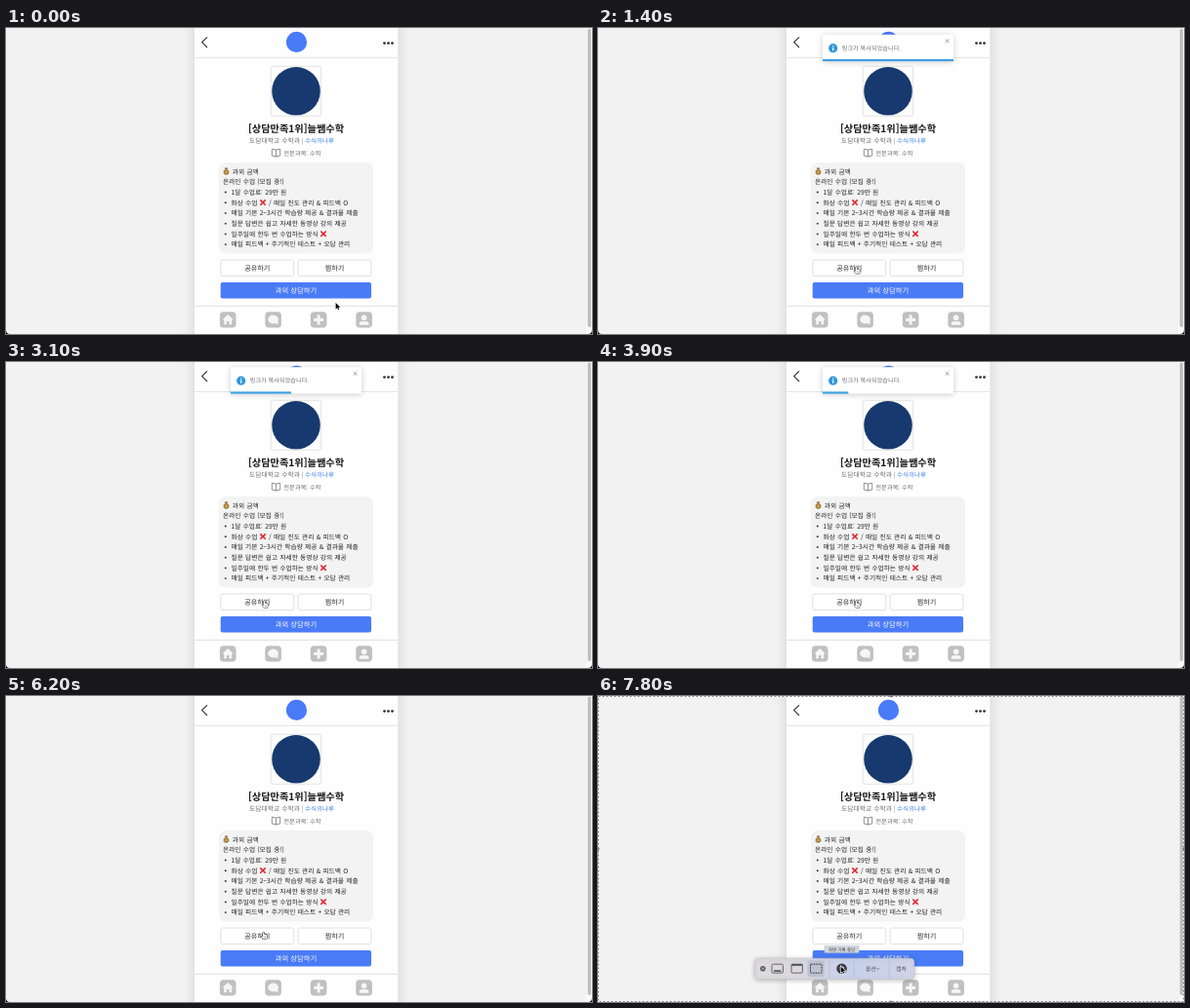
An HTML page with a canvas for the animation above (7900 ms loop, 600x314 px).

```html
<!DOCTYPE html>
<html lang="ko">
<head>
<meta charset="utf-8">
<title>과외 프로필</title>
<style>
html, body { margin: 0; width: 100%; height: 100%; overflow: hidden; background: #f2f2f2; }
canvas { display: block; width: 600px; height: 314px; }
</style>
</head>
<body>
<canvas id="stage"></canvas>
<script>
const LOOP = 7900, STEP = 100, W = 600, H = 314;
const FONT = '"Noto Sans CJK KR", "Noto Sans CJK", "Noto Sans CJK JP", sans-serif';
const BLUE = '#4a7bf7', INK = '#222';

const canvas = document.getElementById('stage');
const ctx = canvas.getContext('2d');
const dpr = window.devicePixelRatio || 1;
canvas.width = W * dpr;
canvas.height = H * dpr;
ctx.scale(dpr, dpr);

const clamp = v => Math.max(0, Math.min(1, v));
const easeOut = p => 1 - (1 - p) ** 3;
const easeInOut = p => p * p * (3 - 2 * p);

// Value of a keyframed track [[time, value], ...] at time t.
function track(t, keys, ease) {
  for (let i = 1; i < keys.length; i++) {
    const [t0, a] = keys[i - 1], [t1, b] = keys[i];
    if (t < t1) return a + (b - a) * ease(clamp((t - t0) / (t1 - t0)));
  }
  return keys[keys.length - 1][1];
}

function box(x, y, w, h, r, fill, stroke, lw = 0.8) {
  ctx.beginPath();
  ctx.roundRect(x, y, w, h, r);
  if (fill) { ctx.fillStyle = fill; ctx.fill(); }
  if (stroke) { ctx.strokeStyle = stroke; ctx.lineWidth = lw; ctx.stroke(); }
}

function disc(x, y, r, fill) {
  ctx.beginPath();
  ctx.arc(x, y, r, 0, Math.PI * 2);
  ctx.fillStyle = fill;
  ctx.fill();
}

function line(points, color, lw = 1) {
  ctx.beginPath();
  points.forEach(([x, y], i) => i ? ctx.lineTo(x, y) : ctx.moveTo(x, y));
  ctx.strokeStyle = color;
  ctx.lineWidth = lw;
  ctx.stroke();
}

function poly(points, fill, stroke, lw) {
  ctx.beginPath();
  points.forEach(([x, y], i) => i ? ctx.lineTo(x, y) : ctx.moveTo(x, y));
  ctx.closePath();
  if (stroke) { ctx.strokeStyle = stroke; ctx.lineWidth = lw; ctx.stroke(); }
  ctx.fillStyle = fill;
  ctx.fill();
}

// y is the vertical middle of the glyphs.
function text(s, x, y, size, color = INK, align = 'left', weight = 400, gap = 0) {
  ctx.font = `${weight} ${size}px ${FONT}`;
  ctx.textAlign = align;
  ctx.textRendering = 'geometricPrecision';
  ctx.wordSpacing = gap + 'px';
  ctx.fillStyle = color;
  ctx.fillText(s, x, y + size * 0.37);
}

function cross(x, y, r, color, lw) {
  line([[x - r, y - r], [x + r, y + r]], color, lw);
  line([[x + r, y - r], [x - r, y + r]], color, lw);
}

function withShadow(alpha, blur, dy, paint) {
  ctx.save();
  ctx.shadowColor = `rgba(0,0,0,${alpha})`;
  ctx.shadowBlur = blur * dpr;
  ctx.shadowOffsetY = dy * dpr;
  paint();
  ctx.restore();
}

function drawPage() {
  ctx.fillStyle = '#f2f2f2';
  ctx.fillRect(0, 0, W, H);
  withShadow(0.13, 14, 0, () => box(193, -20, 208.3, 354, 0, '#fefefe'));
  ctx.fillStyle = '#fafafa';
  ctx.fillRect(594.5, 0, 5.5, H);
  box(595.6, 0.5, 3.4, 306.5, 1.7, '#bfbfbf');
}

function drawHeader() {
  line([[206, 9.3], [200.6, 14.6], [206, 20]], '#333', 1.1);
  disc(297.5, 14.4, 10.6, BLUE);
  for (let i = 0; i < 3; i++) disc(387.5 + i * 4, 15.6, 1.4, '#333');
  line([[193, 30.5], [401.3, 30.5]], '#e3e3e3', 0.9);
}

function drawProfile() {
  box(271.3, 39.3, 51.2, 51, 1.5, '#fff', '#ddd');
  disc(297, 64.8, 24.8, '#17396f');
  text('[상담만족1위]늘쌤수학', 297, 103, 10.2, '#151515', 'center', 700);
  text('도담대학교 수학과', 249, 115.5, 6.8, '#707070');
  text('|', 302.6, 115.5, 6.4, '#888');
  text('수식의나루', 306, 115.5, 6.5, '#3b82e6', 'left', 500);
  line([[276.5, 125], [272.3, 124.2], [272.3, 131], [276.5, 132], [280.7, 131],
        [280.7, 124.2], [276.5, 125], [276.5, 132]], '#777', 0.8);
  text('전문과목: 수학', 284.3, 128.2, 6.3, '#707070');
}

function drawFee() {
  box(218, 138, 158, 93.5, 7, '#f3f3f3');
  poly([[223.8, 143.6], [227.2, 143.6], [226.4, 145.4], [224.6, 145.4]], '#8a6a35');
  ctx.beginPath();
  ctx.ellipse(225.5, 148, 2.9, 2.7, 0, 0, Math.PI * 2);
  ctx.fillStyle = '#a5813f';
  ctx.fill();
  disc(225.5, 148, 1, '#e2c25c');

  const row = i => 157.6 + i * 10.72;
  const write = (s, x, y) => text(s, x, y, 6.7, INK, 'left', 500, 0.4);
  write('과외 금액', 231.8, 147.2);
  write('온라인 수업 (모집 중!)', 222, row(0));
  const items = [
    '1달 수업료: 29만 원', '화상 수업', '매일 기본 2~3시간 학습량 제공 & 결과물 제출',
    '질문 답변은 쉽고 자세한 동영상 강의 제공', '일주일에 한두 번 수업하는 방식',
    '매일 피드백 + 주기적인 테스트 + 오답 관리'
  ];
  items.forEach((s, i) => {
    disc(224.8, row(i + 1) + 0.2, 0.9, INK);
    write(s, 230.5, row(i + 1));
  });
  write('/ 매일 진도 관리 & 피드백 O', 269, row(2));
  cross(263, row(2), 2.7, '#de2b34', 1.7);
  cross(325, row(5), 2.7, '#de2b34', 1.7);
}

function drawButtons() {
  box(219.9, 238, 74.8, 16.6, 2, '#fff', '#d9d9d9');
  box(299.1, 238, 74.8, 16.6, 2, '#fff', '#d9d9d9');
  text('공유하기', 257.2, 246.2, 7.1, INK, 'center', 500);
  text('찜하기', 336.5, 246.2, 7.1, INK, 'center', 500);
  box(219.7, 261, 154.3, 16.5, 2, BLUE);
  text('과외 상담하기', 297, 269, 7.3, '#fff', 'center', 500);
}

function drawNav() {
  line([[193, 285.3], [401.3, 285.3]], '#dedede', 0.9);
  const y = 299.4, white = '#f6f6f6', xs = [227.2, 273.6, 320.1, 366.6];
  xs.forEach(x => box(x - 8.3, y - 8.2, 16.6, 16.4, 3.8, '#c0c0c0'));
  const [home, chat, plus, user] = xs;
  poly([[home, y - 5.3], [home + 5.6, y - 0.2], [home + 4, y - 0.2], [home + 4, y + 4.8],
        [home + 1.3, y + 4.8], [home + 1.3, y + 1.5], [home - 1.3, y + 1.5],
        [home - 1.3, y + 4.8], [home - 4, y + 4.8], [home - 4, y - 0.2], [home - 5.6, y - 0.2]], white);
  ctx.beginPath();
  ctx.ellipse(chat, y - 0.4, 5.4, 4.4, 0, 0, Math.PI * 2);
  ctx.fillStyle = white;
  ctx.fill();
  poly([[chat + 1.5, y + 3], [chat + 5, y + 5.2], [chat + 4.6, y + 1]], white);
  ctx.fillRect(plus - 5, y - 1.5, 10, 3);
  ctx.fillRect(plus - 1.5, y - 5, 3, 10);
  disc(user, y - 2.2, 2.8, white);
  box(user - 5, y + 1.5, 10, 3.8, [3.4, 3.4, 0.5, 0.5], white);
}

function drawCorners() {
  ctx.fillStyle = '#000';
  for (const [x, d] of [[0, 1], [W, -1]]) {
    ctx.beginPath();
    ctx.moveTo(x, H - 4);
    ctx.quadraticCurveTo(x, H, x + 4 * d, H);
    ctx.lineTo(x, H);
    ctx.fill();
  }
}

function drawToast(t) {
  const start = 1061, out = 4490, scale = 0.46;
  if (t < start || t > out + 700) return;
  const drop = t < out
    ? track(t - start, [[0, -3000], [420, 25], [525, -10], [630, 5], [700, 0]], easeOut)
    : track(t - out, [[0, 0], [140, -10], [280, 20], [315, 20], [700, -2000]], easeInOut);
  ctx.save();
  ctx.globalAlpha = t < out ? 1 : 1 - easeInOut(clamp((t - out - 315) / 385));
  ctx.translate(0, drop * scale);
  withShadow(0.2, 6, 1, () => box(230, 5.2, 134, 27.4, 1.8, '#fff'));
  disc(240.7, 19.2, 4.6, '#3498db');
  ctx.fillStyle = '#fff';
  ctx.fillRect(240.1, 18.5, 1.2, 3.2);
  ctx.fillRect(240.1, 16.5, 1.2, 1.2);
  text('링크가 복사되었습니다.', 249.7, 19, 6.2, '#707070');
  cross(357.6, 11.8, 1.9, '#858585', 0.8);
  const left = 1 - clamp((t - 1489) / 3000);
  ctx.fillStyle = '#3f9fe0';
  ctx.fillRect(230, 30.4, 134 * left, 2.2);
  ctx.restore();
}

function drawSelection() {
  ctx.lineWidth = 1;
  ctx.strokeStyle = '#fff';
  ctx.strokeRect(0.5, 0.5, W - 1, H - 1);
  ctx.setLineDash([2, 2]);
  ctx.strokeStyle = '#8a8a8a';
  ctx.strokeRect(0.5, 0.5, W - 1, H - 1);
  ctx.setLineDash([]);
  for (const [x, y] of [[0, H / 2], [W, H / 2], [W / 2, 0], [W / 2, H]]) disc(x, y, 1.5, '#777');
}

function drawToolbar() {
  const tint = ctx.createLinearGradient(160, 0, 324, 0);
  tint.addColorStop(0, '#dedadd');
  tint.addColorStop(0.28, '#d9d8de');
  tint.addColorStop(0.6, '#c6d0ea');
  tint.addColorStop(1, '#d0d5e6');
  withShadow(0.25, 5, 1, () => box(160.5, 269.2, 163.3, 21.3, 4, tint, '#c3c4cc', 0.5));

  const ink = '#484a52', y = 279.7;
  disc(168.8, y, 2.8, '#5c5d64');
  cross(168.8, y, 1.1, '#e2e2e6', 0.7);
  box(214.5, 271.3, 17.2, 17, 2.5, '#bcc0cf');
  box(178, 275.2, 11.4, 9, 1.2, null, ink, 0.8);
  ctx.fillStyle = ink;
  ctx.fillRect(180, 281.4, 7.4, 1.5);
  box(198, 275.2, 11.4, 9, 1.2, null, ink, 0.8);
  ctx.fillRect(198, 275.2, 11.4, 1.6);
  ctx.setLineDash([1.7, 1]);
  box(217.5, 275.2, 11.6, 9, 0.5, null, '#30323a', 1);
  ctx.setLineDash([]);
  for (const x of [236.8, 262.2, 298.2]) line([[x, 271], [x, 289]], '#b2b7c8', 0.6);
  disc(249.6, y, 5.3, '#3a3d48');
  box(247.7, y - 1.9, 3.8, 3.8, 0.5, '#dfe3f0');
  text('옵션', 274, y, 5.7, ink);
  line([[285.2, y - 0.5], [286.6, y + 0.9], [288, y - 0.5]], ink, 0.7);
  text('캡처', 305.3, y, 5.7, ink);
}

function drawCapture(t) {
  if (t < 6500) return;
  drawSelection();
  drawToolbar();
  if (t < 7700) return;
  box(232, 256.4, 35.2, 7.2, 0.8, '#d2d5dc', '#b3b6bf', 0.5);
  text('화면 기록 중단', 249.6, 260, 4.5, '#333', 'center', 500);
}

function drawArrow(x, y) {
  const shape = [[0, 0], [0, 6.4], [1.5, 5.1], [2.5, 7.3], [3.5, 6.9], [2.6, 4.7], [4.6, 4.6]];
  poly(shape.map(([a, b]) => [x + a, y + b]), '#000', '#fff', 1.2);
}

// (x, y) is the tip of the index finger.
function drawHand(x, y) {
  ctx.save();
  ctx.translate(x, y);
  ctx.scale(0.9, 0.9);
  ctx.lineJoin = 'round';
  poly([[-0.7, 0], [0.5, 0], [0.6, 2.6], [3.7, 3.3], [4, 5.2], [3.2, 8], [-0.7, 8],
        [-2.7, 4.8], [-2, 4.3], [-0.8, 5.3]], '#fff', '#222', 1.1);
  line([[1, 4.8], [1, 6.8]], '#333', 0.4);
  line([[2.3, 4.8], [2.3, 6.8]], '#333', 0.4);
  ctx.restore();
}

function drawCursor(t) {
  const x = track(t, [[500, 337.6], [1000, 264.6], [5300, 264.6], [5700, 263.8], [6850, 263.8], [7300, 248.6]], easeInOut);
  const y = track(t, [[500, 282], [1000, 245.2], [5300, 245.2], [5700, 242.3], [6850, 242.3], [7300, 277.4]], easeInOut);
  const onBar = t >= 6500 && y > 269;
  const onButton = (y > 238 && y < 254.6 && (x < 294.7 || x > 299)) || (y > 261 && y < 277.5);
  if (onButton && !onBar) drawHand(x, y);
  else drawArrow(x, y);
}

function draw(t) {
  drawPage();
  drawHeader();
  drawProfile();
  drawFee();
  drawButtons();
  drawNav();
  drawToast(t);
  drawCorners();
  drawCapture(t);
  drawCursor(t);
}

const begin = performance.now();
function tick() {
  const t = Math.max(0, performance.now() - begin) % LOOP;
  draw(Math.floor(t / STEP) * STEP);
  requestAnimationFrame(tick);
}
tick();
</script>
</body>
</html>
```
